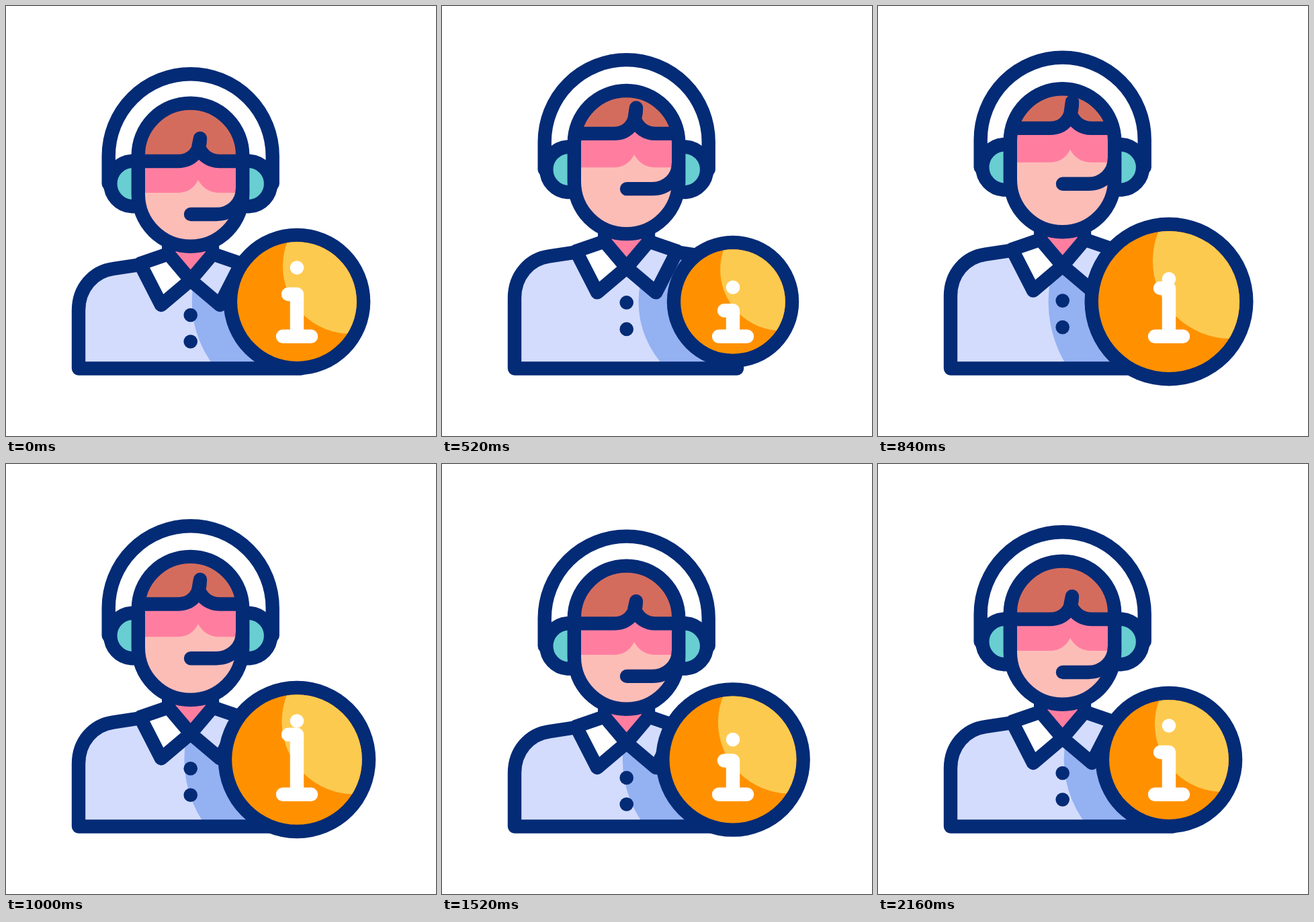
An HTML page with a canvas that plays this animation: 640 by 640 pixels, repeating every 2.44 s.

```html
<!DOCTYPE html>
<html>
<head>
<meta charset="utf-8">
<style>
html, body { margin: 0; width: 100%; height: 100%; overflow: hidden; background: #fff; }
canvas { display: block; }
</style>
</head>
<body>
<canvas id="stage" width="640" height="640"></canvas>
<script>
const ctx = document.getElementById('stage').getContext('2d');
const NAVY = '#042b76', WHITE = '#fff', SKIN = '#fdbdb7', PINK = '#ff7ea0', HAIR = '#d46c5d',
  TEAL = '#68ced1', SHIRT = '#d3dcfd', SHADE = '#94b1f2', ORANGE = '#ff9100', YELLOW = '#fdca50';
const LOOP = 2440, STEP = 40, LINE = 20.4, MID = 274.7, REST = 109.3;

// Eases in and out from one key [time, value] to the next.
function ease(t, ...keys) {
  const i = keys.findIndex(key => t < key[0]);
  if (i < 0) return keys.at(-1)[1];
  if (i === 0) return keys[0][1];
  const [t0, v0] = keys[i - 1], [t1, v1] = keys[i];
  return v0 + (v1 - v0) * (1 - Math.cos(Math.PI * (t - t0) / (t1 - t0))) / 2;
}

// One nod shared by body, headphones and hair, each with its own reach.
const nod = (t, up, down) => ease(t, [180, 0], [710, -up], [1280, down], [1840, 0]);
const coinRadius = t => ease(t, [0, REST], [425, 94.5], [845, 125.5], [1290, 95], [1675, 125.5], [2160, REST]);
const stemShift = t => ease(t, [0, 0], [440, 26], [1150, -32.5], [1560, 13.5], [1935, 0]);
const dotShift = t => ease(t, [0, 0], [640, 32], [1220, -25], [1570, 23], [2056, 0]);

function shape(d, fill, stroke) {
  const path = new Path2D(d);
  if (fill) { ctx.fillStyle = fill; ctx.fill(path); }
  if (stroke) { ctx.strokeStyle = stroke; ctx.stroke(path); }
}

function disc(x, y, r, fill) {
  ctx.fillStyle = fill;
  ctx.beginPath();
  ctx.arc(x, y, r, 0, 7);
  ctx.fill();
}

function within(d, draw) {
  ctx.save();
  ctx.clip(new Path2D(d));
  draw();
  ctx.restore();
}

function shifted(dy, draw, flip) {
  ctx.save();
  ctx.translate(flip ? 2 * MID : 0, dy);
  if (flip) ctx.scale(-1, 1);
  draw();
  ctx.restore();
}

function drawBody(b, r) {
  const torso = `M108 539.5 V${453 + b} C108 ${420 + b} 130 ${395 + b} 160 ${391 + b}
    L200 ${385 + b} L242 ${369 + b} H307 L349 ${385 + b} L389 ${391 + b}
    C419 ${395 + b} 439 ${420 + b} 439 ${453 + b} V539.5 Z`;
  shape(torso, SHIRT);
  within(torso, () => disc(433, 440, r * 1.43, SHADE));
  shape(torso, null, NAVY);
  shifted(b, () => {
    shape('M242 350 H307 V369 L274.7 408 L242 369 Z', PINK);
    shape('M242.2 345 V369 M307 345 V369', null, NAVY);
    [WHITE, SHIRT].forEach((fill, flip) => shifted(0, () =>
      shape('M199.5 383.5 L241.7 369 L274.7 408 L231 445 Z', fill, NAVY), flip));
    disc(MID, 460, 10.3, NAVY);
    disc(MID, 499.5, 10.3, NAVY);
  });
}

function drawHead(b, h, g) {
  for (const flip of [false, true]) shifted(h, () =>
    shape('M192 230.8 H186.5 A33.8 33.8 0 0 0 186.5 298.2 H192', TEAL, NAVY), flip);
  shifted(h, () => shape('M152.7 264.5 V223.2 A122 122 0 0 1 396.7 223.2 V264.5', null, NAVY));

  const face = `M196.8 ${222.3 + b} A77.7 77.7 0 0 1 352.2 ${222.3 + b}
    V${280 + b} A77.7 77.7 0 0 1 196.8 ${280 + b} Z`;
  const m = g * .92, line = 231 + g, tip = 197 + g * 1.11;
  const left = `H256 C276 ${line} 289 ${line - 14} 289 ${tip}`;
  const right = `L286.5 ${line - 22} C292 ${line - 8} 303 ${line} 318 ${line} H360`;
  shape(face, SKIN);
  within(face, () => {
    shifted(m, () => shape('M190 0 V278 H257 Q277 277 286 259 Q296 277 316 278 H360 V0 Z', PINK));
    shape(`M190 0 V${line} ${left} ${right} V0 Z`, HAIR);
    shape(`M190 ${line} ${left} ${right}`, null, NAVY);
  });
  shape(face, null, NAVY);
  shifted(m, () => shape('M275 310 H313 C334.5 310 352 294 352 272', null, NAVY));
}

function drawCoin(r, stem, dot) {
  const k = r / REST;
  disc(433, 440, r, NAVY);
  ctx.save();
  ctx.beginPath();
  ctx.arc(433, 440, r - LINE, 0, 7);
  ctx.clip();
  disc(433, 440, r, ORANGE);
  disc(433 + 80 * k, 440 - 53 * k, 101 * k, YELLOW);
  ctx.restore();
  shape(`M420 ${429 + stem} H433 V491.7 M412 491.7 H454`, null, WHITE);
  disc(433, 389.5 + dot, 10.3, WHITE);
}

function frame(now) {
  const t = Math.floor(now % LOOP / STEP) * STEP;
  const body = nod(t, 26, 11.5), r = coinRadius(t);
  ctx.fillStyle = WHITE;
  ctx.fillRect(0, 0, 640, 640);
  ctx.lineCap = ctx.lineJoin = 'round';
  ctx.lineWidth = LINE;
  drawBody(body, r);
  drawHead(body, nod(t, 29.5, 10.5), nod(t, 57.5, 10.5));
  drawCoin(r, stemShift(t), dotShift(t));
}

const start = performance.now();
(function tick() {
  frame(performance.now() - start);
  requestAnimationFrame(tick);
})();
</script>
</body>
</html>
```
